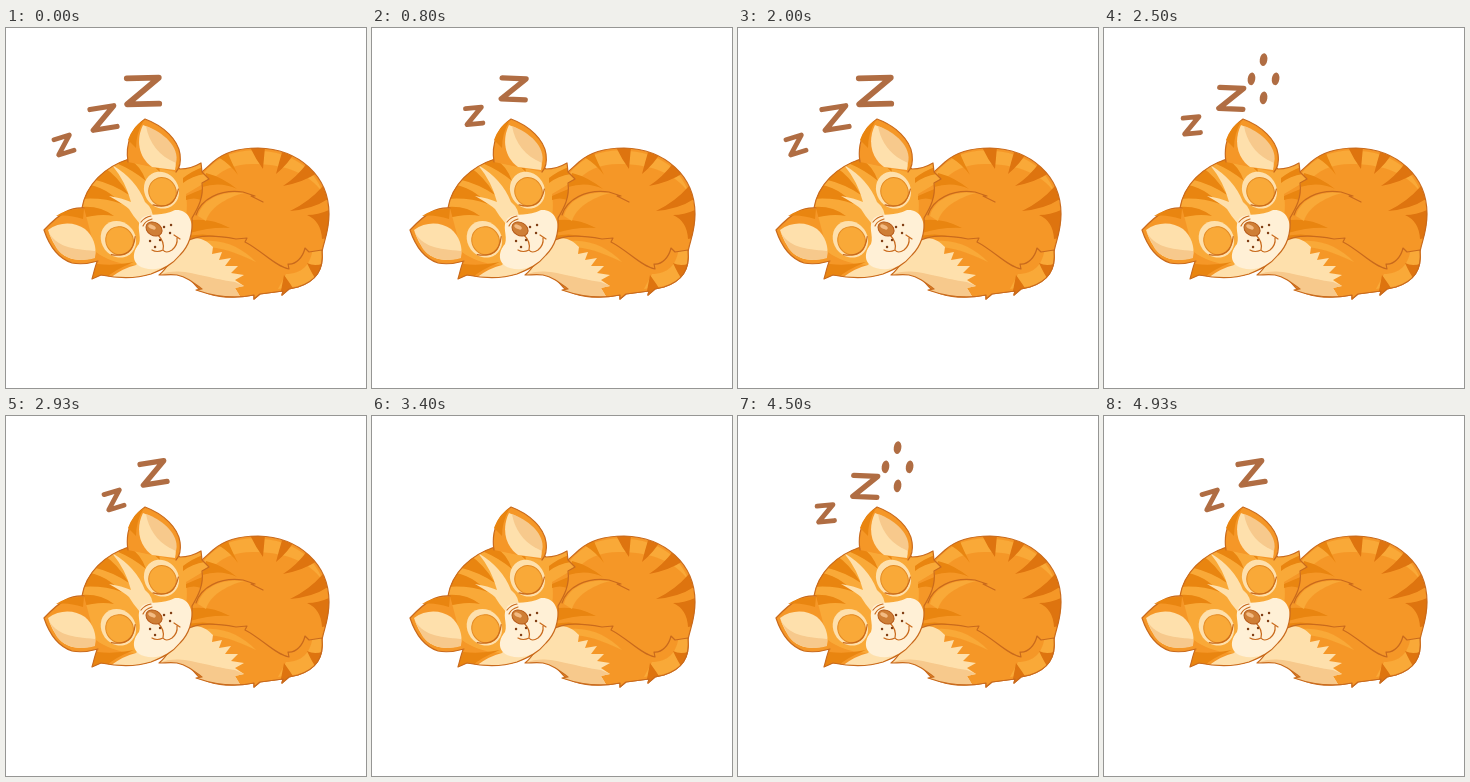
Write an HTML page that moves like this. It is 360x360 px and loops after 5000 ms.

```html
<!DOCTYPE html>
<html lang="en">
<head>
<meta charset="utf-8">
<title>Sleeping kitten</title>
<style>
  html, body { margin: 0; width: 100%; height: 100%; overflow: hidden; background: #fff; }
  svg { display: block; width: 100%; height: 100%; stroke-linecap: round; stroke-linejoin: round; }
  .line { fill: none; stroke: #c96a1c; stroke-width: 1.2; }
  .fur { fill: #f59727; }
  .light { fill: #f9a938; }
  .dark { fill: #e98510; }
  .stripe { fill: #de740f; }
  .cream { fill: #fee0ac; }
  .pale { fill: #fff0d6; }
  .peach { fill: #f7c98c; }
  .z { fill: none; stroke: #b06d43; }
  .dot { fill: #b06d43; }
</style>
</head>
<body>
<svg viewBox="0 0 360 360">
  <defs>
    <path id="body" d="M184 158C190 147 200 141 207 134C218 124 234 120 252 120C293 121 323 148 323 186C323 203 318 213 316 224C318 242 310 253 292 259L283 261L276 267L277 263L254 266L248 271L248 267C222 272 202 268 192 260L165 230Z"/>
    <path id="tail" d="M153 247C164 239 167 224 180 214C192 205 214 208 230 211L241 210L239 214C255 222 270 239 283 241L282 236C290 237 297 229 299 220L303 224L316 222C318 242 310 253 292 259L283 261L276 267L277 263L254 266L248 271L248 267C228 271 207 268 190 262L196 261C188 255 181 249 171 247C165 246 159 247 153 247Z"/>
    <path id="head" d="M86 251C88 244 89 239 91 234C78 222 74 200 76 180C80 157 98 139 123 131C140 127 160 130 174 141C182 141 190 138 195 135L196 144L203 151L196 155C198 169 192 180 186 190C187 204 184 217 174 227C166 237 157 241 145 246C126 252 105 249 95 247Z"/>
    <clipPath id="inBody"><use href="#body"/></clipPath>
    <clipPath id="inTail"><use href="#tail"/></clipPath>
    <clipPath id="inHead"><use href="#head"/></clipPath>
    <g id="eye">
      <ellipse class="cream" cy="-1" rx="17" ry="19"/>
      <ellipse class="light" cy="1" rx="13.5" ry="14.5" stroke="#e48a22"/>
      <path class="line" d="M-15 7Q0 23 15 7" stroke-width="1.6"/>
    </g>
  </defs>

  <use href="#body" class="fur"/>
  <g clip-path="url(#inBody)">
    <path class="light" d="M198 145C213 126 236 121 254 123C285 124 308 140 317 165C303 145 280 137 251 136C230 135 214 141 203 156Z"/>
    <path class="stripe" d="M244 119Q249 130 257 141Q258 130 259 119ZM277 121Q273 134 270 146Q283 135 288 125ZM302 134Q291 149 277 158Q298 154 311 145ZM317 158Q303 174 284 183Q307 181 322 171ZM325 181Q313 187 301 187Q315 193 316 211L325 209Z"/>
    <path class="dark" d="M200 145Q216 149 231 161Q215 153 196 159ZM212 129Q224 136 232 147Q224 131 222 125ZM186 192Q206 190 224 200Q204 199 184 205ZM182 208Q200 204 218 210H184Z"/>
    <path class="light" d="M192 188C196 171 217 162 238 165C219 170 204 180 200 193Z"/>
  </g>
  <path class="line" d="M190 187C195 171 214 161 237 164L249 168L245 168L257 174"/>
  <use href="#body" class="line"/>

  <use href="#tail" class="fur"/>
  <g clip-path="url(#inTail)">
    <path class="light" d="M280 246C296 246 305 237 307 219H320V240C315 255 295 258 272 261ZM183 216C212 207 234 218 250 234C227 223 213 218 193 219Z"/>
    <path class="stripe" d="M274 268L278 247Q284 255 290 265ZM301 235Q306 246 311 253L318 235Q309 239 301 235Z"/>
    <path class="cream" d="M150 248L164 225L180 212C194 207 201 213 207 219L206 226L216 224L213 232L225 230L219 238L232 238L225 245L238 247L229 252L238 258L229 260L235 270H192Z"/>
    <path class="peach" d="M153 247C173 238 191 248 229 254L238 258L229 260L235 270H190Z"/>
  </g>
  <use href="#tail" class="line"/>

  <use href="#head" class="light"/>
  <g clip-path="url(#inHead)">
    <path class="fur" d="M73 200C82 225 105 239 145 237C174 224 184 192 180 166L207 150L191 206L145 252H80Z"/>
    <path class="dark" d="M96 138Q112 148 123 167Q107 156 86 151ZM80 156Q100 159 116 176Q96 169 75 171ZM74 179Q94 177 108 188Q92 185 74 191ZM121 129Q135 138 140 153Q127 142 110 135ZM145 128Q153 135 154 144Q145 136 137 129ZM177 150Q186 143 197 139L199 146Q186 148 177 155ZM180 168Q189 164 199 160L195 172Q188 169 180 172ZM86 251L91 236Q110 238 128 234Q108 242 100 250Z"/>
    <path class="cream" d="M106 137Q130 151 139 174Q148 181 147 193L134 196Q127 188 123 181Q119 177 103 168Q116 170 125 174Q120 154 106 137Z"/>
    <path class="cream" d="M104 250Q117 240 130 237L140 225L184 198L187 211C174 238 140 256 104 250Z"/>
    <path class="pale" d="M136 190C144 184 157 189 169 182C181 181 187 191 186 205C179 230 158 246 138 240C125 236 126 224 133 216C136 207 129 198 136 190Z"/>
  </g>
  <use href="#head" class="line"/>
  <use href="#eye" transform="translate(156 163) rotate(-32)"/>
  <use href="#eye" transform="translate(113 212) rotate(-37)"/>
  <path class="line" d="M135 194Q139 189 145 188M137 198Q139 193 146 191M152 207Q159 214 157 222Q160 226 166 222Q172 217 171 210M157 222Q151 225 146 222M168 207L174 211"/>
  <ellipse cx="148" cy="201" rx="8.5" ry="6.5" transform="rotate(30 148 201)" fill="#cf7f36" stroke="#b65a18"/>
  <ellipse cx="146" cy="199" rx="4" ry="2" transform="rotate(25 146 199)" fill="#f3bb83"/>
  <path d="M158 199h.1M165 197h.1M164 205h.1M144 213h.1M149 219h.1M154 212h.1" stroke="#824016" stroke-width="2.4"/>

  <path class="fur line" style="fill:#f59727" d="M78 180C65 179 55 184 38 202C43 217 51 230 66 235C76 237 85 235 92 233"/>
  <path class="cream" d="M42 202C54 193 69 194 79 201C87 208 91 218 89 229C74 235 61 231 54 224Q46 215 42 202Z"/>
  <path class="peach" d="M42 203C50 219 66 221 89 223V230C72 235 58 230 51 221Z"/>
  <path class="dark" d="M50 188Q62 186 77 191L78 181Q61 180 50 188Z"/>
  <path class="fur line" style="fill:#f59727" d="M122 134C119 115 126 100 139 91C158 98 172 112 174 126C175 134 173 141 170 144"/>
  <path class="cream" d="M137 97C130 111 132 129 146 139L169 142C174 121 156 104 137 97Z"/>
  <path class="peach" d="M140 98C143 115 153 128 170 135C174 119 157 104 140 98Z"/>
  <path class="dark" d="M122 112Q127 98 138 92Q130 105 130 120Z"/>
  <g id="sleep"></g>
</svg>
<script>
const sleep = document.getElementById("sleep");
const LOOP = 5000, CYCLE = 2000, OFFSET = 600;
const LIFT = 630, BURST = 200;

// Four drops fly apart where a letter was.
function burst(x, y, u) {
  const spread = 0.5 + u, size = 1.2 - 0.4 * u;
  let drops = "";
  for (let k = 0; k < 4; k++) {
    const a = k * Math.PI / 2;
    const dx = 12 * Math.sin(a) * spread, dy = -19 * Math.cos(a) * spread;
    drops += `<ellipse class="dot" rx="${3.8 * size}" ry="${6.4 * size}"
      transform="translate(${x - 2 + dx} ${y + 4 + dy}) rotate(8)"/>`;
  }
  return drops;
}

// Letters 0 to 2 get larger; each appears, drifts up to the right and bursts.
function letter(i, t) {
  const start = 100 + 130 * i, pop = 1800 - 200 * i * i;
  if (t < start || t >= pop + BURST) return "";
  const rise = Math.max(0, Math.min(t, pop) - LIFT);
  const drift = 50 * (rise / 900) ** 0.8;
  const x = 58 + 39.5 * i + drift, y = 117 - 27 * i - 0.66 * drift;
  if (t >= pop) return burst(x, y, (t - pop) / BURST);

  const tilt = -11 + 8 * i - 6 * Math.cos(rise / 300 * 2 * Math.PI);
  const scale = Math.min(1, 0.15 + (t - start) / 200);
  const w = 16 + 8 * i, h = 16 + 5 * i;
  return `<path class="z" stroke-width="${4.8 + 0.5 * i}"
    d="M${-w / 2} ${-h / 2}h${w}l${-w} ${h}h${w}"
    transform="translate(${x} ${y}) rotate(${tilt}) scale(${scale})"/>`;
}

function frame(now) {
  const t = (now % LOOP + OFFSET) % CYCLE;
  sleep.innerHTML = [0, 1, 2].map(i => letter(i, t)).join("");
  requestAnimationFrame(frame);
}
frame(performance.now());
</script>
</body>
</html>
```
